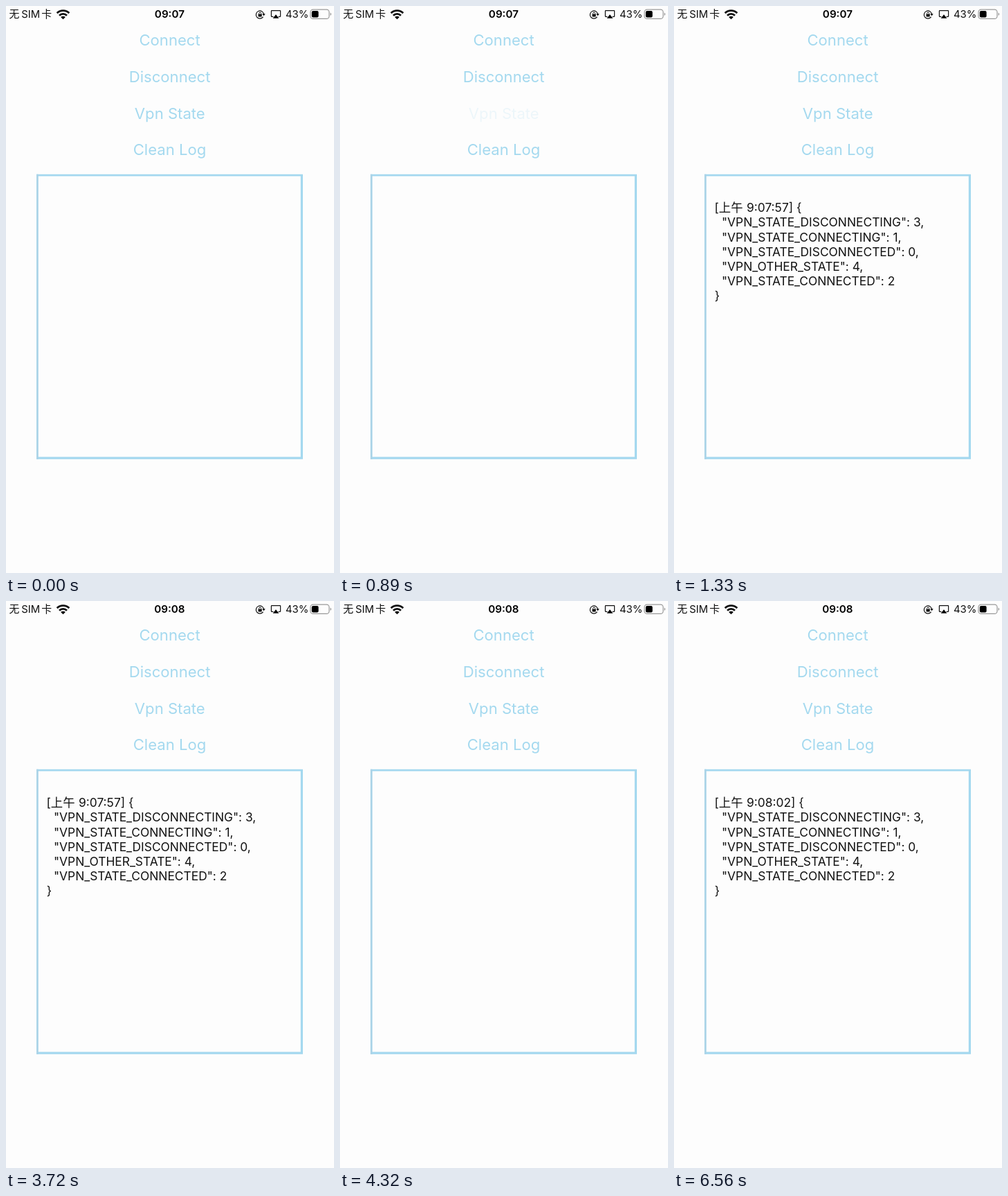
An HTML page that plays this animation: 474 px wide and 818 px high, repeating every 8 s.

```html
<!DOCTYPE html>
<html lang="zh-CN">
<head>
<meta charset="utf-8">
<title>VPN state log</title>
<style>
  html, body { margin: 0; width: 100%; height: 100%; overflow: hidden; background: #fdfdfd; }
  svg { display: block; width: 474px; height: 818px; font-family: Inter, "Noto Sans CJK SC", "Noto Sans CJK", sans-serif; }
  .status { font-size: 14.9px; }
  .clock { font-size: 15.2px; font-weight: 600; text-anchor: middle; }
  .buttons { font-size: 22.1px; fill: #a4d9ef; text-anchor: middle; }
  .log { font-size: 17.36px; fill: #111; }
  .line { fill: none; stroke: #111; }

  /* Every change is a hard step on one shared 8 s loop. */
  .vpn, .clean, .log, .early, .late, .first, .second { animation: 8s step-end infinite; }
  .vpn { animation-name: press-vpn; }
  .clean { animation-name: press-clean; }
  .log { animation-name: log; }
  .early { animation-name: early; }
  .late { animation-name: late; }
  .first { animation-name: first; }
  .second { animation-name: second; }

  @keyframes press-vpn { 0%, 16.625%, 100% { opacity: 1 } 11.125% { opacity: .18 } }
  @keyframes press-clean { 0%, 54%, 100% { opacity: 1 } 50.25% { opacity: .18 } 52.125% { opacity: .6 } }
  @keyframes log { 0%, 50.25% { opacity: 0 } 14.875%, 82%, 100% { opacity: 1 } }
  @keyframes early { 0% { opacity: 1 } 46.5%, 100% { opacity: 0 } }
  @keyframes late { 0% { opacity: 0 } 46.5%, 100% { opacity: 1 } }
  @keyframes first { 0% { opacity: 1 } 50.25%, 100% { opacity: 0 } }
  @keyframes second { 0% { opacity: 0 } 50.25%, 100% { opacity: 1 } }
</style>
</head>
<body>
<svg viewBox="0 0 474 818">
  <g class="status" fill="#111">
    <text x="4.5" y="17.4">无</text>
    <text x="22.3" y="17.4">SIM</text>
    <text x="51.3" y="17.4">卡</text>
    <text x="404" y="17.4">43%</text>
  </g>
  <g class="clock">
    <text class="early" x="236.4" y="17.4">09:07</text>
    <text class="late" x="236.4" y="17.4">09:08</text>
  </g>

  <!-- Wi-Fi -->
  <g class="line" stroke="#000" stroke-width="2.8">
    <path d="M73.7 10.3a12.3 12.3 0 0 1 17.6 0"/>
    <path d="M77 13.7a7.8 7.8 0 0 1 11 0"/>
  </g>
  <path d="M79.2 16a4.7 4.7 0 0 1 6.6 0L82.5 19.2z"/>

  <!-- Rotation lock -->
  <path class="line" stroke-width="1.2" d="M371.6 15.7a5.6 5.6 0 1 1 .9-3.8"/>
  <path d="M370.3 11.2h4.4l-2.2 3z"/>
  <rect x="364.6" y="11.7" width="5" height="3.8" rx=".5"/>
  <path class="line" d="M365.6 12v-1.4a1.5 1.5 0 0 1 3 0V12"/>

  <!-- Screen mirroring -->
  <path class="line" stroke-width="1.2" d="M386.4 15.4h-2.4q-.6 0-.6-.6v-7.6q0-.6.6-.6h12q.6 0 .6.6v7.6q0 .6-.6.6h-2.4"/>
  <path d="M390 12.3l4.4 5.5h-8.8z"/>

  <!-- Battery -->
  <rect class="line" x="440" y="5.2" width="27" height="13.2" rx="3.7" stroke-width="1.2" style="stroke:#999"/>
  <rect x="441.8" y="7" width="9.8" height="9.6" rx="2"/>
  <path d="M468.6 9.4q1.6.7 1.6 2.3t-1.6 2.3z" fill="#999"/>

  <g class="buttons">
    <text x="236.6" y="57">Connect</text>
    <text x="236.6" y="109.7">Disconnect</text>
    <text class="vpn" x="236.8" y="162.6">Vpn State</text>
    <text class="clean" x="236.5" y="214.6">Clean Log</text>
  </g>

  <g fill="#a4d8ef">
    <path d="M44 242.7h385v2.7H44zM44 650.6h385v3.2H44zM425.8 242.7h3.2v411h-3.2z"/>
    <path d="M44 242.7h2.8v411H44z" fill="#abd4e8"/>
  </g>

  <g class="log">
    <text class="first" x="58.5" y="297.2">[上午<tspan x="105">9:07:57] {</tspan></text>
    <text class="second" x="58.5" y="297.2">[上午<tspan x="105">9:08:02] {</tspan></text>
    <text>
      <tspan x="69" y="318.4">"VPN_STATE_DISCONNECTING": 3,</tspan>
      <tspan x="69" y="339.5">"VPN_STATE_CONNECTING": 1,</tspan>
      <tspan x="69" y="360.7">"VPN_STATE_DISCONNECTED": 0,</tspan>
      <tspan x="69" y="381.8">"VPN_OTHER_STATE": 4,</tspan>
      <tspan x="69" y="403">"VPN_STATE_CONNECTED": 2</tspan>
      <tspan x="58.8" y="424.1">}</tspan>
    </text>
  </g>
</svg>
</body>
</html>
```
